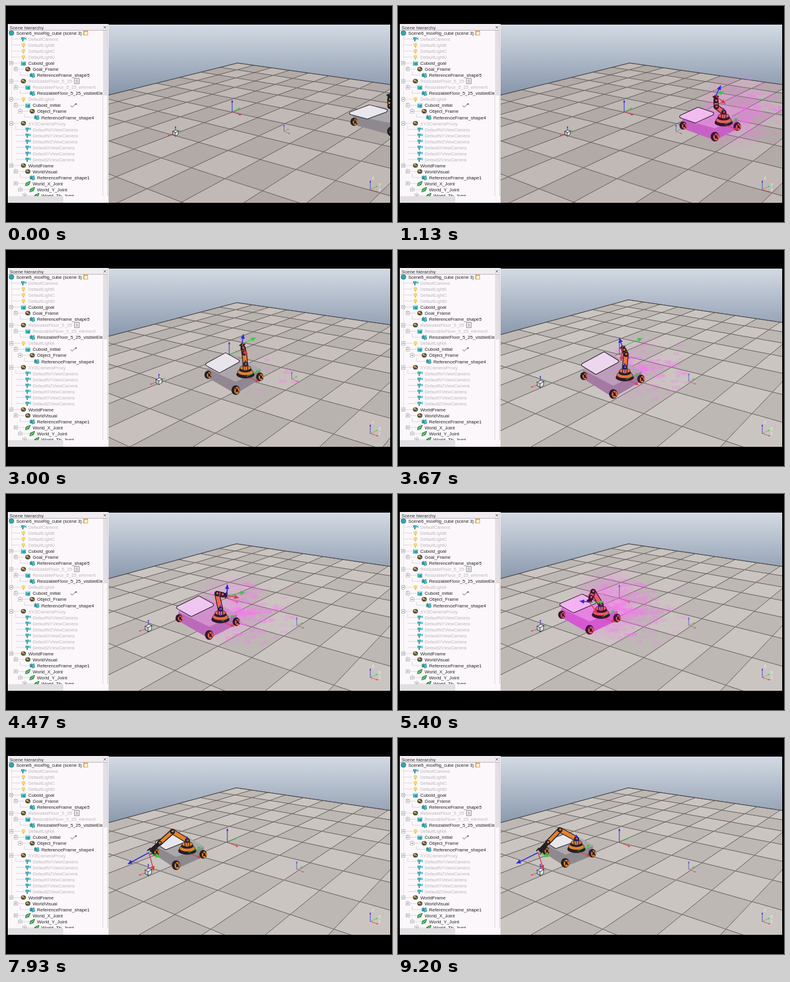
Recreate the animation shown at these times as an HTML page with a canvas. Size 640 px wide and 360 px high, loop 9270 ms.

```html
<!DOCTYPE html>
<html lang="en">
<head>
<meta charset="utf-8">
<title>Robot simulation</title>
<style>
  html, body { margin: 0; height: 100%; overflow: hidden; background: #000; }
  canvas { display: block; width: 100vw; height: 100vh; }
</style>
</head>
<body>
<canvas id="stage" width="640" height="360"></canvas>
<script>
const ctx = document.getElementById('stage').getContext('2d');
const LOOP = 9270;
const BLUE = '#2929d8', RED = '#e23442', GREEN = '#35c940', DARK = '#211e24';

const mix = (a, b, k) => a + (b - a) * k;
const mixPoint = (a, b, k) => [mix(a[0], b[0], k), mix(a[1], b[1], k)];
const add = (a, b) => [a[0] + b[0], a[1] + b[1]];
const clamp = (v) => Math.max(0, Math.min(1, v));
const smooth = (v) => { v = clamp(v); return v * v * (3 - 2 * v); };
const mixColor = (a, b, k) => `rgb(${a.map((v, i) => Math.round(mix(v, b[i], k)))})`;
const noise = (n) => { const v = Math.sin(n * 127.1 + 11.7) * 43758.5453; return v - Math.floor(v); };

function polygon(points, fill, stroke, width = 0.8) {
  ctx.beginPath();
  points.forEach((p) => ctx.lineTo(...p));
  ctx.closePath();
  if (stroke) { ctx.strokeStyle = stroke; ctx.lineWidth = width; ctx.stroke(); }
  if (fill) { ctx.fillStyle = fill; ctx.fill(); }
}

function line(points, color, width = 1) {
  ctx.beginPath();
  points.forEach((p) => ctx.lineTo(...p));
  ctx.strokeStyle = color;
  ctx.lineWidth = width;
  ctx.stroke();
}

function ellipse([x, y], rx, ry, fill, stroke) {
  ctx.beginPath();
  ctx.ellipse(x, y, rx, ry, 0, 0, 7);
  ctx.fillStyle = fill;
  ctx.fill();
  if (stroke) { ctx.strokeStyle = stroke; ctx.lineWidth = 0.8; ctx.stroke(); }
}

function rect(x, y, w, h, fill) {
  ctx.fillStyle = fill;
  ctx.fillRect(x, y, w, h);
}

function text(str, x, y, color, size = 7.7) {
  ctx.font = `${size}px "Liberation Sans", Arial, sans-serif`;
  ctx.fillStyle = color;
  ctx.fillText(str, x, y);
}

function arrow(from, offset, color, head = 4, width = 1) {
  const tip = add(from, offset), a = Math.atan2(offset[1], offset[0]);
  line([from, tip], color, width);
  const corner = (s) => [tip[0] - head * Math.cos(a + s), tip[1] - head * Math.sin(a + s)];
  polygon([tip, corner(0.45), corner(-0.45)], color);
}

// Scene tree: [label, depth, icon, greyed, expandable]
const tree = [
  ['DefaultCamera', 1, 'camera', 1, 0], ['DefaultLightB', 1, 'light', 1, 0],
  ['DefaultLightC', 1, 'light', 1, 0], ['DefaultLightD', 1, 'light', 1, 0],
  ['Cuboid_goal', 1, 'cube', 0, 1], ['Goal_Frame', 2, 'frame', 0, 1],
  ['ReferenceFrame_shape5', 3, 'shape', 0, 0],
  ['ResizableFloor_5_25', 1, 'frame', 1, 1], ['ResizableFloor_5_25_element', 2, 'cube', 1, 1],
  ['ResizableFloor_5_25_visibleElement', 3, 'shape', 0, 0],
  ['DefaultLightA', 1, 'light', 1, 1], ['Cuboid_initial', 2, 'cube', 0, 1],
  ['Object_Frame', 3, 'frame', 0, 1], ['ReferenceFrame_shape4', 4, 'shape', 0, 0],
  ['XYZCameraProxy', 1, 'frame', 1, 1],
  ...['NX', 'NY', 'NZ', 'X', 'Y', 'Z'].map((n) => [`Default${n}ViewCamera`, 2, 'camera', 1, 0]),
  ['WorldFrame', 1, 'frame', 0, 1], ['WorldVisual', 2, 'frame', 0, 1],
  ['ReferenceFrame_shape1', 3, 'shape', 0, 0],
  ['World_X_Joint', 2, 'joint', 0, 1], ['World_Y_Joint', 3, 'joint', 0, 1],
  ['World_Th_Joint', 4, 'joint', 0, 1]
];

const icons = {
  camera(x, y) {
    rect(x - 4, y - 3, 6, 4, '#42aeb9');
    polygon([[x + 1, y - 1], [x + 5, y - 3], [x + 5, y + 2]], '#5cc1c8');
    rect(x - 2, y + 1, 2, 3, '#4b7d88');
  },
  light(x, y) { ellipse([x, y - 0.5], 3.2, 3.2, '#f4d878'); rect(x - 1, y + 2, 2, 2, '#c5b890'); },
  cube(x, y) {
    rect(x - 4, y - 3, 8, 7, '#3fb3b5');
    polygon([[x - 4, y - 2], [x - 1, y - 4], [x + 4, y - 3], [x + 1, y - 1]], '#a5e6e4');
    line([[x + 1, y - 1], [x + 1, y + 4]], '#157a80');
  },
  frame(x, y) {
    ellipse([x, y], 4.2, 3.7, '#4f4a35');
    ellipse([x - 1, y - 1], 1.7, 1.5, '#e2b965');
    ellipse([x + 1.6, y + 0.6], 1.2, 1.1, '#7fc06a');
  },
  shape(x, y) {
    polygon([[x - 4, y - 2], [x - 1, y - 4], [x, y + 3], [x - 4, y + 3]], '#3a8f95');
    polygon([[x, y - 2], [x + 3, y - 3], [x + 4, y + 3], [x, y + 4]], '#49bfc0', '#2b6c72', 1);
  },
  joint(x, y) {
    polygon([[x - 4, y + 4], [x - 3, y - 1], [x + 4, y - 4], [x + 2, y + 2]], '#3aa04a', '#276b34', 1);
    line([[x - 3, y + 3], [x + 2, y - 2]], '#c4e8b0');
  }
};

function drawPanel() {
  rect(3, 30, 167, 298, '#fbf7fb');
  rect(3, 31, 165, 9, '#f0ecf1');
  rect(161, 41, 7, 108, '#e3dfe3');
  rect(3, 317, 92, 11, '#e2dfe2');
  text('Scene hierarchy', 6, 38.5, '#333', 7.8);
  line([[162, 33.5], [166, 37.5]], '#444', 0.9);
  line([[166, 33.5], [162, 37.5]], '#444', 0.9);
  line([[3, 40.5], [168, 40.5]], '#a9a6ac', 0.8);
  line([[160.5, 149], [160.5, 317]], '#d3cfd4', 0.8);
  line([[168.5, 31], [168.5, 317]], '#c6c2c8', 0.8);

  ctx.save();
  ctx.beginPath();
  ctx.rect(4, 41, 156, 276);
  ctx.clip();
  ellipse([9, 45], 4, 4, '#36a6ad', '#29737d');
  text('Scene6_moxRig_cube (scene 3)', 17, 48, '#222', 7.5);
  rect(128, 41, 8, 8, '#eba750');
  rect(130, 43, 5, 5, '#fbf2d8');
  line([[9.5, 50], [9.5, 265]], '#d5d3d7', 0.6);
  tree.forEach(([label, depth, icon, grey, expandable], row) => {
    const y = 55 + row * 10.04;
    const textX = 29.6 + depth * 7.3, iconX = textX - 8, boxX = textX - 28;
    line([[boxX, y], [iconX - 5, y]], '#c3c0c5', 0.6);
    if (expandable) {
      line([[boxX + 7.3, y + 4], [boxX + 7.3, y + 10]], '#c3c0c5', 0.6);
      polygon([[boxX - 2.5, y - 2.5], [boxX + 2.5, y - 2.5], [boxX + 2.5, y + 2.5], [boxX - 2.5, y + 2.5]],
        '#fff', '#8c898e', 1.2);
      line([[boxX - 1.3, y], [boxX + 1.3, y]], '#333', 0.8);
    }
    icons[icon](iconX, y);
    text(label, textX, y + 3, grey ? '#bbb7bc' : '#252326', label.startsWith('Default') ? 7.3 : 7.7);
  });
  polygon([[114, 121], [121, 121], [121, 129], [114, 129]], '#e8e6e8', '#777', 1.4);
  line([[116, 124], [119, 124]], '#777', 0.7);
  line([[116, 126.5], [119, 126.5]], '#777', 0.7);
  line([[107, 166], [110, 168.5], [115, 163.5]], '#555', 0.9);
  ellipse([116, 163.5], 1.3, 1.3, '#555');
  ctx.restore();
}

// Far corner of the floor, vanishing points of its two edges, depth per tile.
const cameras = [
  { apex: [384, 95], left: [1000, -59], right: [-700, -59], stepLeft: 0.045, stepRight: 0.0245 },
  { apex: [382, 83], left: [900, -59], right: [-577, -59], stepLeft: 0.052, stepRight: 0.026 }
];

function drawFloor(k) {
  const [a, b] = cameras;
  const apex = mixPoint(a.apex, b.apex, k);
  const left = mixPoint(a.left, b.left, k), right = mixPoint(a.right, b.right, k);
  const sl = mix(a.stepLeft, b.stepLeft, k), sr = mix(a.stepRight, b.stepRight, k);
  const weight = (i, j) => 1 - i * sl - j * sr;
  const project = (i, j) => [0, 1].map((n) =>
    (apex[n] - i * sl * left[n] - j * sr * right[n]) / weight(i, j));
  const light = mixColor([192, 185, 181], [203, 197, 193], k);
  const dark = mixColor([178, 170, 167], [190, 184, 181], k);
  for (let i = 0; i < 12; i++) for (let j = 0; j < 14; j++) {
    if (weight(i + 1, j + 1) < 0.08) continue;
    const tile = [project(i, j), project(i + 1, j), project(i + 1, j + 1), project(i, j + 1)];
    polygon(tile, (i + j) % 2 ? dark : light);
    polygon(tile, null, '#625c5a', 0.8);
  }
  line([project(11, 0), apex, project(0, 13)], '#454142', 1);
}

function drawMarkers(k) {
  const world = mixPoint([375, 176], [367, 174], k);
  const size = mix(1, 1.2, k);
  const scaled = (x, y) => [x * size, y * size];
  arrow(world, scaled(13, -6), GREEN, 4, 0.9);
  arrow(world, scaled(15, 6), RED, 4, 0.9);
  arrow(world, scaled(0, -19), BLUE, 4);

  const goal = mixPoint([461, 209], [482, 219], k);
  arrow(goal, scaled(8, -4), '#55b45c', 3, 0.7);
  arrow(goal, scaled(10, 4), '#d0505e', 3, 0.7);
  arrow(goal, scaled(0, -11), '#4848cd', 3, 0.8);

  const cube = mixPoint([281, 211.5], [236, 223], k), s = mix(4, 4.8, k);
  const at = (x, y) => add(cube, [x * s, y * s]);
  arrow(cube, scaled(-13, 5), RED, 3, 0.8);
  arrow(cube, scaled(9, -4), GREEN, 3, 0.8);
  arrow(cube, scaled(0, -11), BLUE, 3, 0.8);
  polygon([at(-1, -0.5), at(0.2, -1.1), at(1.1, -0.7), at(0, 0)], '#edf0f2', DARK, 1.4);
  polygon([at(-1, -0.5), at(0, 0), at(0, 1.2), at(-1, 0.7)], '#b9c4cc', DARK, 1.4);
  polygon([at(0, 0), at(1.1, -0.7), at(1, 0.6), at(0, 1.2)], '#dbe0e3', DARK, 1.4);
}

function drawCompass() {
  const o = [604, 306];
  arrow(o, [12, -6], GREEN, 3, 0.8);
  arrow(o, [13, 4], RED, 3, 0.8);
  arrow(o, [0, -15], BLUE, 3, 0.8);
  text('z', 607, 289, '#f4f4f4', 7);
  text('y', 618, 299, '#f4f4f4', 7);
  text('x', 618, 308, '#f4f4f4', 7);
}

// Points: front wheel; left wheel, right wheel, elbow and gripper relative to it;
// blue, red and green axis vectors relative to the gripper.
const poses = [
  [0, [639, 209], [-62, -16], [40, -15], [-2, -42], [-3, -62], [8, -16], [16, 12], [14, -8]],
  [2330, [405, 227], [-43, -21], [34, -19], [7, -58], [6, -74], [9, -19], [16, 14], [12, -8]],
  [3670, [357, 240], [-49, -30], [46, -25], [21, -66], [15, -79], [-5, -14], [-2, 24], [33, -14]],
  [4470, [337, 235], [-50, -28], [45, -22], [13, -69], [29, -66], [1, -18], [20, 4], [30, -5]],
  [6400, [297, 217], [-42, -22], [46, -17], [-2, -58], [-32, -25], [-34, 16], [6, 35], [18, 5]],
  [7930, [282, 212], [-34, -22], [45, -18], [-6, -56], [-45, -21], [-35, 19], [8, 30], [18, 8]],
  [9270, [277, 208], [-32, -20], [45, -16], [-9, -55], [-45, -17], [-36, 18], [9, 28], [18, 7]]
];

function poseAt(t) {
  const n = Math.max(1, poses.findIndex((p) => p[0] >= t));
  const a = poses[n - 1], b = poses[n];
  const k = (t - a[0]) / (b[0] - a[0]);
  return a.slice(1).map((p, i) => mixPoint(p, b[i + 1], k));
}

const refreshTimes = [0, 2900, 7600];
const lastRefresh = (t) => refreshTimes.filter((r) => r <= t).pop();
function tintAt(t) {
  if (t < 2900) return clamp(t / 1500);
  return t < 7600 ? clamp((t - 2900) / 2700) : 0;
}

function drawSmear(t) {
  const start = lastRefresh(t), tint = tintAt(t), count = 950;
  if (!tint) return;
  const centre = add(poseAt(t)[0], [32, -42]);
  const glow = ctx.createRadialGradient(...centre, 10, ...centre, 68);
  glow.addColorStop(0, `rgba(255,100,245,${0.45 * tint})`);
  glow.addColorStop(1, 'rgba(255,100,245,0)');
  rect(centre[0] - 70, centre[1] - 70, 140, 140, glow);
  for (let i = 0; i < count; i++) {
    const birth = i / count * 7600;
    if (birth < start || birth > t) continue;
    const [x, y] = poseAt(birth)[0];
    const r = 65 * noise(i), a = 6.3 * noise(i + 0.37);
    const alpha = 0.3 * Math.exp((birth - t) / 2000);
    rect(x + 38 + r * Math.cos(a), y - 42 + r * 0.85 * Math.sin(a),
      4 + 12 * noise(i + 0.61), 1.5 + 5 * noise(i + 0.83), `rgba(255,110,245,${alpha})`);
  }
}

function drawRobot(t) {
  const [front, l, r, e, g, blue, red, green] = poseAt(t);
  const tint = tintAt(t);
  const left = add(front, l), right = add(front, r), back = add(left, r);
  const elbow = add(front, e), grip = add(front, g);
  const orange = mixColor([228, 130, 45], [245, 60, 130], tint * 0.65);
  const grey = mixColor([142, 137, 142], [232, 75, 228], tint * 0.85);
  const pale = mixColor([172, 167, 171], [246, 120, 240], tint * 0.85);
  const black = mixColor([35, 32, 35], [75, 8, 65], tint * 0.6);
  const lift = (p, h) => [p[0], p[1] - h];
  ctx.lineJoin = 'round';

  const wheel = (p, s = 1) => {
    ellipse(p, 7 * s, 8 * s, black);
    ellipse(add(p, [2, 0.5]), 4.6 * s, 6 * s, orange);
    line([add(p, [-1, -4]), add(p, [5, 4])], black, 1.6);
    line([add(p, [4, -4]), add(p, [0, 4])], black, 1);
    ellipse(add(p, [2, 0.5]), 2.2 * s, 2.6 * s, black);
  };

  wheel(back, 0.7);
  polygon([lift(left, 11), lift(front, 15), add(front, [0, 5]), add(left, [0, 4])], grey, grey, 2);
  polygon([lift(front, 15), lift(right, 13), add(right, [0, 3]), add(front, [0, 5])], grey, grey, 2);
  polygon([lift(left, 11), lift(front, 15), lift(right, 13), lift(back, 11)], pale, pale, 2);
  wheel(left, 0.85);
  wheel(right, 0.9);
  wheel(front);

  // Loading plate: rounded parallelogram over the rear half of the base
  const plateAt = add(mixPoint(left, back, 0.5), [4, -9]);
  const plate = [[-1, -1], [1, -1], [1, 1], [-1, 1]].map(([u, v]) =>
    [0, 1].reduce((p, n) => { p[n] = plateAt[n] + u * 0.38 * r[n] - v * 0.22 * l[n]; return p; }, []));
  const plateColor = mixColor([232, 231, 236], [250, 150, 245], tint * 0.7);
  polygon(plate, DARK, DARK, 6);
  polygon(plate, plateColor, plateColor, 4);

  const base = add(front, [r[0] * 0.5 - 4, r[1] * 0.5 - 19]);
  const shoulder = lift(base, 13);
  ellipse(add(base, [0, 4]), 15, 6.5, black);
  ellipse(base, 13, 5.5, orange, black);
  ellipse(lift(base, 4), 10.5, 4.5, black);
  ellipse(lift(base, 7), 9, 4, orange, black);

  ctx.lineCap = 'round';
  line([lift(base, 6), shoulder, elbow], black, 9);
  line([lift(base, 6), shoulder, elbow], orange, 6.5);
  const wrist = mixPoint(elbow, grip, 0.55);
  line([elbow, wrist], black, 8.5);
  line([elbow, wrist], orange, 5.5);
  line([wrist, mixPoint(elbow, grip, 0.88)], black, 7);
  ctx.lineCap = 'butt';
  for (const p of [shoulder, elbow, wrist]) {
    ellipse(p, 4, 4, black);
    ellipse(add(p, [0.5, -0.5]), 1.8, 1.8, orange);
  }
  const side = Math.atan2(grip[1] - wrist[1], grip[0] - wrist[0]) + Math.PI / 2;
  const jaw = [4 * Math.cos(side), 4 * Math.sin(side)];
  const palm = mixPoint(wrist, grip, 0.7);
  line([add(palm, jaw), add(grip, jaw)], black, 2);
  line([add(palm, jaw.map((v) => -v)), add(grip, jaw.map((v) => -v))], black, 2);

  arrow(add(base, [5, 9]), [18, 7], RED, 6, 1);
  arrow(add(base, [2, 7]), [21, -10], GREEN, 6, 1);
  arrow(lift(base, 3), [0, -17], BLUE, 4, 1);
  arrow(grip, green, GREEN, 8, 1.1);
  arrow(grip, red, RED, 8, 1.4);
  arrow(grip, blue, BLUE, 8, 1.5);
}

function drawScene(t) {
  ctx.save();
  ctx.beginPath();
  ctx.rect(170, 31, 467, 297);
  ctx.clip();
  const sky = ctx.createLinearGradient(0, 31, 0, 150);
  sky.addColorStop(0, '#d3dae3');
  sky.addColorStop(1, '#8594aa');
  rect(170, 31, 467, 297, sky);
  const k = smooth((t - 2600) / 700);
  drawFloor(k);
  drawMarkers(k);
  drawSmear(t);
  drawRobot(t);
  drawCompass();
  ctx.restore();
}

function frame(now) {
  rect(0, 0, 640, 360, '#000');
  drawPanel();
  drawScene(now % LOOP);
  requestAnimationFrame(frame);
}
requestAnimationFrame(frame);
</script>
</body>
</html>
```
